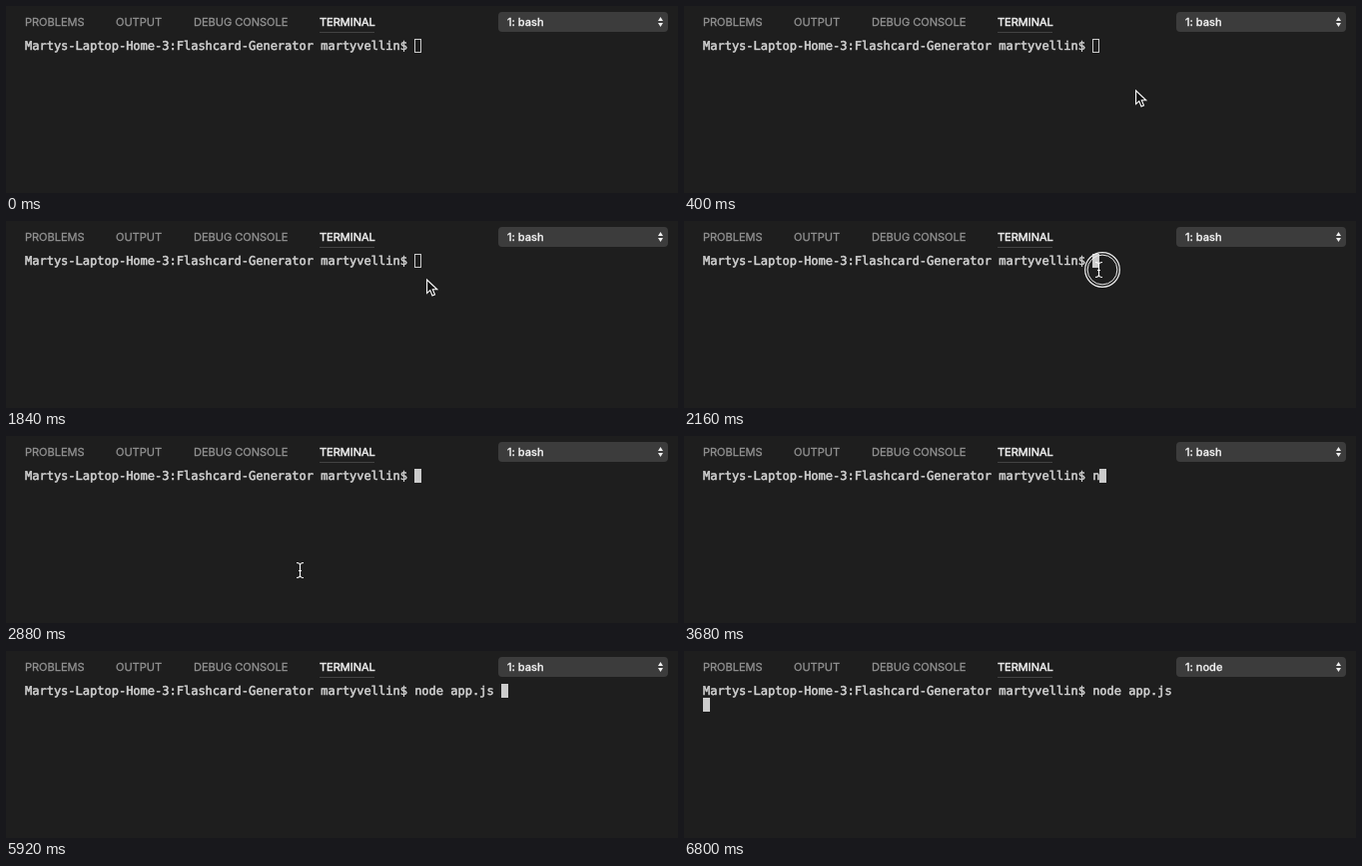
Animation of 673x188 px, one loop 8 s. Source, as an HTML page:

```html
<!DOCTYPE html>
<html lang="en">
<head>
<meta charset="utf-8">
<title>Terminal panel</title>
<style>
  html, body { margin: 0; width: 100%; height: 100%; overflow: hidden; background: #1e1e1e; }
  svg { display: block; }
  text { text-rendering: geometricPrecision; white-space: pre; }
  .ui { font: 11px Inter, sans-serif; fill: #929292; stroke: #929292; stroke-width: .3px; }
  .ui .on { fill: #eee; stroke: #eee; stroke-width: .5px; }
  .ui .pick { font-weight: 500; fill: #f0f0f0; stroke: #f0f0f0; }
  .mono { font: 12px "DejaVu Sans Mono", monospace; fill: #d4d4d4; stroke: #d4d4d4; stroke-width: .5px; }
</style>
</head>
<body>
<svg width="673" height="188" viewBox="0 0 673 188">
  <rect width="673" height="188" fill="#1e1e1e"/>
  <g class="ui">
    <text x="19" y="20">PROBLEMS</text>
    <text x="110" y="20">OUTPUT</text>
    <text x="188" y="20">DEBUG CONSOLE</text>
    <text x="314" y="20" class="on">TERMINAL</text>
    <rect x="314" y="26" width="55" height="1" fill="#424242" stroke="none"/>
    <rect x="493" y="6" width="170" height="20" rx="4" fill="#3c3c3c" stroke="none"/>
    <text x="502" y="20" class="pick" id="shell"></text>
    <path d="M653 15l2.5-4 2.5 4zM653 17h5l-2.5 4z" fill="#f0f0f0" stroke="none"/>
  </g>
  <text class="mono" x="19" y="44" id="line"></text>
  <rect id="caret" stroke="#ccc"/>
  <g id="ring" fill="none" stroke="#eee">
    <circle r="17.3" stroke-width="1.2"/>
    <circle r="14.9"/>
  </g>
  <path id="arrow" d="M.6 1V14.6L3.8 11.6 6 17 8.5 16 6.3 10.8H10.8Z" fill="#111" stroke="#fff" stroke-width="1.1"/>
  <path id="beam" d="M-3.5-7.5Q0-7.5 0-5V5Q0 7.5-3.5 7.5M3.5-7.5Q0-7.5 0-5M3.5 7.5Q0 7.5 0 5M-1.5.5H1.5" fill="none" stroke="#fff" stroke-width="1.1"/>
</svg>
<script>
const LOOP = 8000, STEP = 80, CELL = 7.2246;
const PROMPT = 'Martys-Laptop-Home-3:Flashcard-Generator martyvellin$ ';
const COMMAND = 'node app.js ';

// [time, characters typed]
const typing = [[0, 0], [3680, 1], [4000, 2], [4160, 3], [4240, 4],
  [4800, 5], [5040, 6], [5440, 7], [5920, 12]];

// [time, pointer shape, x, y]
const moves = [
  [0, ''],
  [160, 'arrow', 411, 176], [240, 'arrow', 432, 128], [320, 'arrow', 447, 96], [400, 'arrow', 452, 84],
  [1440, 'arrow', 442, 80], [1520, 'arrow', 434, 73], [1600, 'arrow', 428, 66], [1680, 'arrow', 425, 63],
  [1840, 'arrow', 421, 58], [1920, 'beam', 419.5, 55.5],
  [2080, 'beam', 418.5, 55.5], [2160, 'beam', 415.5, 49],
  [2400, 'beam', 412, 38], [2480, 'arrow', 400, 3], [2560, 'arrow', 378, 8], [2640, 'beam', 350, 42],
  [2720, 'beam', 326, 82], [2800, 'beam', 307, 115], [2880, 'beam', 294.5, 135], [2960, 'beam', 281.5, 148.5],
  [3040, '']
];

const el = id => document.getElementById(id);
const at = (keys, t) => keys.findLast(k => k[0] <= t);
const set = (id, attrs) => { for (const k in attrs) el(id).setAttribute(k, attrs[k]); };
const place = (id, shown, x = 0, y = 0) =>
  set(id, { visibility: shown ? 'visible' : 'hidden', transform: `translate(${x} ${y})` });

function draw(t) {
  const count = at(typing, t)[1];
  const entered = t >= 6640;
  const focused = t >= 2080;
  el('line').textContent = PROMPT + COMMAND.slice(0, count);
  el('shell').textContent = t >= 6800 ? '1: node' : '1: bash';

  const x = entered ? 19 : Math.round(19 + (PROMPT.length + count) * CELL);
  const y = entered ? 47 : 33;
  set('caret', focused
    ? { x, y, width: 7, height: 14, fill: '#ccc', 'stroke-width': 0 }
    : { x: x + .5, y: y + .5, width: 6, height: 13, fill: 'none', 'stroke-width': 1 });

  const [, shape, px, py] = at(moves, t);
  const clicking = t >= 2080 && t < 2240;
  place('arrow', shape === 'arrow', px, py);
  place('beam', shape === 'beam', px, py);
  place('ring', clicking, clicking ? px + 3.5 : 0, py);
}

const start = performance.now();
function tick() {
  const t = (performance.now() - start) % LOOP;
  draw(Math.floor(t / STEP) * STEP);
  requestAnimationFrame(tick);
}
tick();
</script>
</body>
</html>
```
